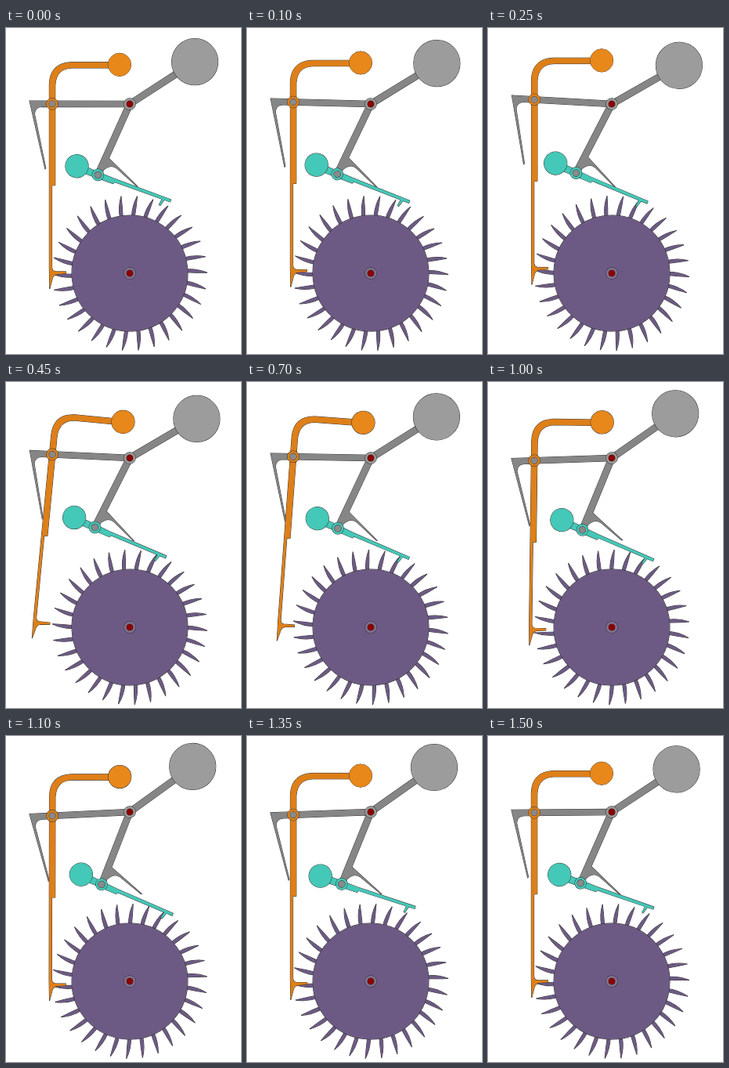
An HTML page that plays this animation: 300 px wide and 416 px high, repeating every 1.55 s.

```html
<!DOCTYPE html>
<html lang="en">
<head>
<meta charset="utf-8">
<title>Grasshopper escapement</title>
<style>
  html, body { margin: 0; height: 100%; overflow: hidden; background: #fff; }
  svg { display: block; }
  path, circle { stroke: #333; stroke-width: 1; paint-order: stroke; }
  .axle { fill: #8b0000; }
  .pin { fill: #8a8a8a; }
</style>
</head>
<body>
<svg width="300" height="416" viewBox="0 0 300 416">
  <g id="wheel" fill="#6c5a84">
    <g id="teeth"></g>
    <circle r="74"/>
    <circle r="7.3" fill="#7f7090"/>
    <circle r="4" class="axle"/>
  </g>
  <g id="arm" fill="#868686">
    <path d="M-128-3.8H0V3.8H-112Q-121 4-121.5 13L-107 82L-108 83Z
             M-2.2-3.4L77.8-55.4L82.2-48.6L2.2 3.4Z
             M3.7 1.6L-36.8 92.1L-44.2 88.9L-3.7-1.6Z
             M-28 68L10 105L9 105L-16 82.5Q-25 75-36 87Z"/>
    <circle cx="83" cy="-54" r="29.6" fill="#9c9c9c"/>
    <circle r="7.3" fill="#999"/>
    <circle r="4" class="axle"/>
  </g>
  <g id="entry" fill="#de7f18">
    <path d="M-3.7-25Q-3-52 24-53.2H75V-45.8H25Q5-45 3.8-24V104H-.4V209Q0 213.5 4 214H17.5V216.5L6 217.3Q2 218 .5 222L-3.2 236L-3.7 210Z"/>
    <circle cx="86" cy="-50" r="14.6" fill="#e8871a"/>
    <circle r="7.3"/>
    <circle r="4" class="pin"/>
  </g>
  <g id="exit" fill="#44c8b7">
    <path d="M-20-4.5L0-3.5L20-2.5L98.5-1.7V1.5H90.5L88 10L86.3 9.5L87.5 1.5H23L22 4H-20Z"/>
    <circle cx="-29" cy="-1.5" r="14.6"/>
    <circle r="7.3"/>
    <circle r="4.2" class="pin"/>
  </g>
</svg>
<script>
const STEPS = 30, TEETH = 30, PITCH = 360 / TEETH;
const el = id => document.getElementById(id);

// Turning points of each part: [step, degrees]
const armKeys = [[0, .1], [5.5, 3.3], [16, -.3], [22.5, -3.1]];
const wheelKeys = [[0, -6.4], [5.5, -3.4], [9, -3.6], [16, .8], [26, 4]];
const entryKeys = [[5, 0], [9, 5.5], [22, 0]];
const exitKeys = [[5, 22.4], [21, 23], [26, 17.8]];

// Monotone cubic through cyclic keys; gain is the advance per cycle
function pose(keys, x, gain = 0) {
  const k = [-1, 0, 1].flatMap(n => keys.map(([s, v]) => [s + n * STEPS, v + n * gain]));
  const slope = n => (k[n + 1][1] - k[n][1]) / (k[n + 1][0] - k[n][0]);
  const tangent = n => {
    const a = slope(n - 1), b = slope(n);
    return a * b > 0 ? 2 * a * b / (a + b) : 0;
  };
  const j = k.findIndex(p => p[0] > x) - 1;
  const [x0, y0] = k[j], [x1, y1] = k[j + 1], h = x1 - x0, u = (x - x0) / h, w = 1 - u;
  return w * w * (1 + 2 * u) * y0 + u * u * (3 - 2 * u) * y1
    + h * u * w * (w * tangent(j) - u * tangent(j + 1));
}

function place(id, x, y, angle) {
  el(id).setAttribute('transform', `translate(${x} ${y}) rotate(${angle})`);
}

function draw(step) {
  const arm = pose(armKeys, step), r = arm * Math.PI / 180;
  const onArm = (x, y) => [
    158 + x * Math.cos(r) - y * Math.sin(r),
    97 + x * Math.sin(r) + y * Math.cos(r)
  ];
  place('wheel', 158, 313, pose(wheelKeys, step, PITCH));
  place('arm', 158, 97, arm);
  place('entry', ...onArm(-99, 0), pose(entryKeys, step));
  place('exit', ...onArm(-40.5, 90.5), pose(exitKeys, step));
}

for (let i = 0; i < TEETH; i++)
  el('teeth').innerHTML += `<path d="M-4.6-72Q-5.5-86 0-99Q0-86-.8-72Z" transform="rotate(${i * PITCH})"/>`;

function frame(now) {
  const tick = Math.floor(now % 1550 / 50);
  draw(tick > 9 ? tick - 1 : tick); // one step is held for two ticks
  requestAnimationFrame(frame);
}
frame(0);
</script>
</body>
</html>
```
